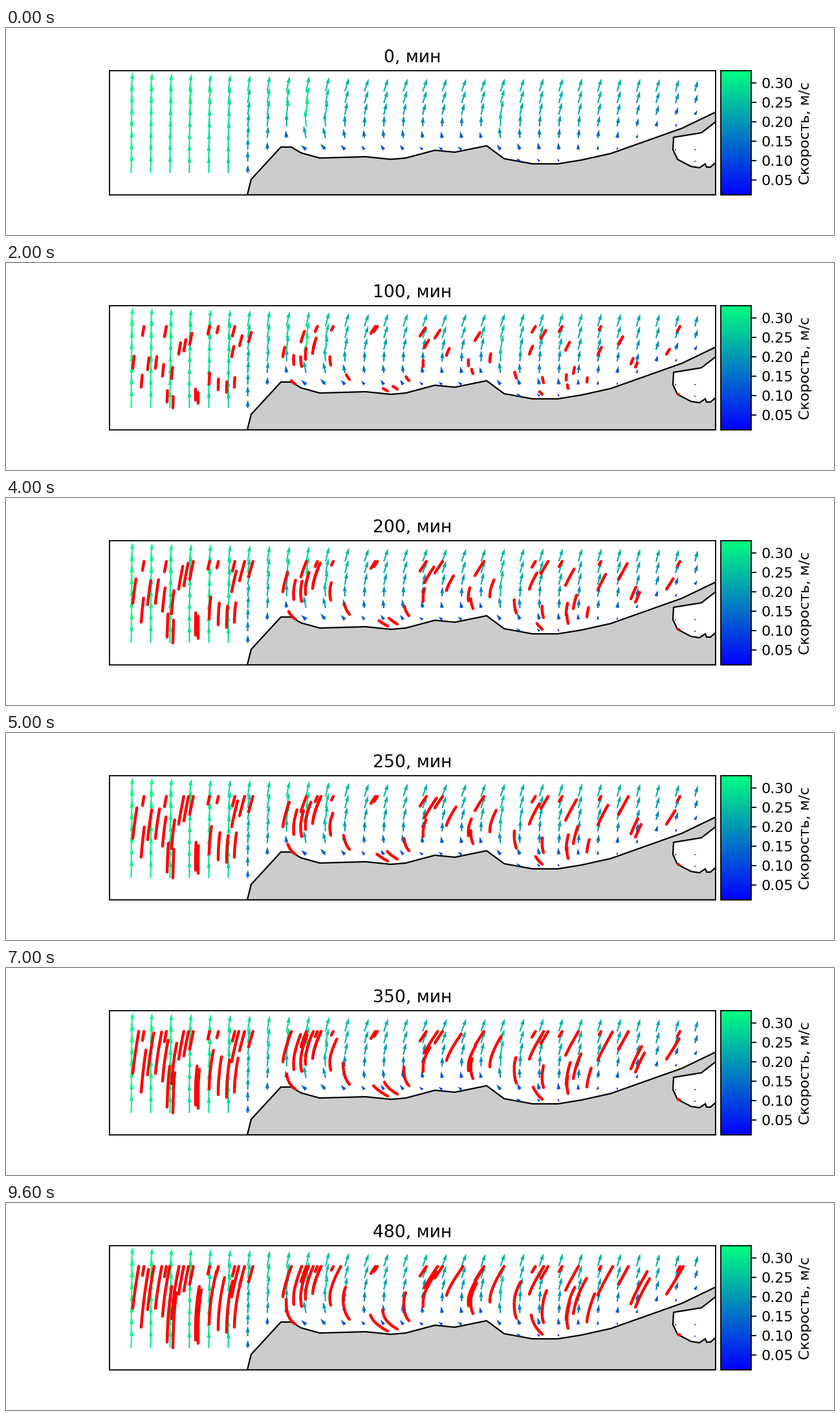
Animation of 1280 by 320 pixels, one loop 9800 ms. Source, as a matplotlib script:

```python
import numpy as np
import matplotlib.pyplot as plt
from matplotlib.animation import FuncAnimation
from matplotlib.collections import LineCollection
from matplotlib.colors import Normalize
from matplotlib.path import Path

W, H, DPI = 1280, 320, 160
FRAMES, INTERVAL = 49, 200
LEFT, RIGHT, TOP, BOTTOM = 160, 1097, 66, 258
X0, DX, Y0, DY = 193.3, 30.06, 98, 18
COLS, ROWS = 30, 8
ARROW_SCALE = 88                    # arrow pixels per m/s
DRIFT = np.array([0.123, -0.065])   # particle pixels per frame and arrow pixel

SHORE = [
    (373, 258), (379, 234), (425, 184), (441, 184), (456, 193), (485, 201),
    (556, 199), (595, 203), (618, 201), (663, 189), (694, 192), (743, 182),
    (770, 202), (814, 210), (853, 210), (890, 204), (935, 194), (1045, 155),
    (1097, 130),
]
INLET = [
    (1097, 145), (1075, 162), (1032, 169), (1031, 188), (1038, 203),
    (1059, 214), (1072, 216), (1081, 210), (1083, 215), (1089, 215),
    (1097, 208), (1097, 258),
]

STARTS = [
    (196, 163), (211, 112), (209, 192), (219, 165), (231, 163), (245, 114),
    (242, 175), (256, 179), (249, 215), (258, 224), (267, 141), (275, 136),
    (284, 126), (293, 212), (297, 217), (312, 110), (314, 187),
    (326, 108), (328, 196), (341, 200), (353, 192), (349, 145), (350, 113),
    (361, 128), (375, 122), (428, 145), (445, 157), (447, 187),
    (456, 122), (457, 160), (463, 149), (474, 140), (475, 132), (478, 106),
    (503, 104), (502, 158), (531, 180), (564, 109), (569, 106),
    (590, 198), (605, 195), (623, 182), (640, 113), (647, 131), (645, 160),
    (663, 116), (681, 143), (715, 159), (722, 171), (725, 120), (748, 153),
    (789, 178), (809, 141), (813, 107), (831, 185), (827, 117), (829, 203),
    (855, 106), (865, 135), (866, 181), (869, 194), (877, 171), (898, 184),
    (915, 142), (917, 103), (947, 126), (966, 156), (973, 161), (1021, 141),
    (1038, 105), (1039, 203),
]


def curve(x, *points):
    return np.interp(x, *zip(*points))


def bump(x, center, width, gain):
    return gain * np.exp(-((x - center) / width) ** 2)


def make_field(x, y):
    """Arrow vectors: surface flow slowed by the bed, turning back with depth."""
    col = (x - X0) / DX
    bed = curve(x, (350, 330), *SHORE[1:])
    height = np.maximum(bed - y, 7)
    depth = np.clip((y - Y0) / 50, 0, 1)
    v = curve(col, (0, 29.3), (3, 27), (6, 25.2), (9, 24.5), (12, 20.2), (29, 21))
    v *= 1 - np.exp(-height / 29)
    v *= 1 + depth * (bump(col, 6.2, .6, -.22) + bump(col, 8.8, 1.2, .35)
                      + bump(col, 18.7, .9, .4))
    u = curve(col, (0, 2.4), (6, 3.6), (12, 6.8), (17, 7.2), (24, 6), (28, 5.4), (29, 4.5))
    turn = curve(col, (0, .25), (3, .55), (7, .5), (8, 1.1), (9, 1.45), (10, 1.4),
                 (12, 1), (19, 1.1), (22, .7), (24, .55), (29, .6))
    u *= 1 - turn * np.array([0, .1, .35, .9, 1.2, 1.7, 1.9, 1.8])[:, None]
    field = np.dstack([u, v])
    field[4, 28:] = 0
    field[5:, 28:] = .5, -.4    # nearly still inlet
    return field


gx, gy = np.meshgrid(X0 + DX * np.arange(COLS), Y0 + DY * np.arange(ROWS))
FIELD = make_field(gx, gy)


def velocity(points):
    """Bilinear velocity at pixel positions."""
    col = np.clip((points[:, 0] - X0) / DX, 0, COLS - 1.001)
    row = np.clip((points[:, 1] - Y0) / DY, 0, ROWS - 1.001)
    c, r = col.astype(int), row.astype(int)
    fc, fr = (col - c)[:, None], (row - r)[:, None]
    upper = FIELD[r, c] * (1 - fc) + FIELD[r, c + 1] * fc
    lower = FIELD[r + 1, c] * (1 - fc) + FIELD[r + 1, c + 1] * fc
    return upper * (1 - fr) + lower * fr


def trace(starts):
    """Particle positions for every frame; particles rest at the top row."""
    path = [np.array(starts, float)]
    for _ in range(FRAMES - 1):
        now = path[-1]
        step = velocity(now) * DRIFT
        room = np.maximum(now[:, 1] - Y0, 0)
        rise = np.maximum(-step[:, 1], 1e-9)
        path.append(now + step * np.minimum(1, room / rise)[:, None])
    return np.array(path).transpose(1, 0, 2)


def axes_box(left, right):
    return [left / W, 1 - BOTTOM / H, (right - left) / W, (BOTTOM - TOP) / H]


plt.rcParams["font.family"] = "DejaVu Sans"
fig = plt.figure(figsize=(W / DPI, H / DPI), dpi=DPI)
ax = fig.add_axes(axes_box(LEFT, RIGHT))
ax.set(xlim=(LEFT, RIGHT), ylim=(BOTTOM, TOP), xticks=[], yticks=[])
land = SHORE + INLET
ax.fill(*zip(*land), facecolor="0.8", edgecolor="black", linewidth=1)

length = np.hypot(FIELD[..., 0], FIELD[..., 1])
nodes = np.column_stack([gx.ravel(), gy.ravel()])
in_land = Path(land + land[:1]).contains_points(nodes).reshape(gx.shape)
wet = ~in_land & (length > 0.5)
wet[6, 7] = False
arrows = ax.quiver(
    gx[wet], gy[wet], FIELD[wet, 0], -FIELD[wet, 1], length[wet] / ARROW_SCALE,
    angles="xy", scale_units="xy", scale=1, units="dots", width=2.1,
    cmap="winter", norm=Normalize(0.0126, 0.3316), zorder=2)

bar = fig.colorbar(arrows, cax=fig.add_axes(axes_box(1104.5, 1152)),
                   ticks=np.arange(1, 7) * 0.05, format="%.2f")
bar.set_label("Скорость, м/с")

trails = LineCollection([], colors="red", linewidths=2, capstyle="round", zorder=3)
ax.add_collection(trails, autolim=False)
title = ax.set_title("0, мин")
paths = trace(STARTS)


def update(i):
    title.set_text(f"{10 * i}, мин")
    trails.set_segments([p[:i + 1] for p in paths] if i else [])
    return trails, title


anim = FuncAnimation(fig, update, frames=FRAMES, interval=INTERVAL,
                     repeat=True, repeat_delay=0, blit=False)
plt.show()
```
